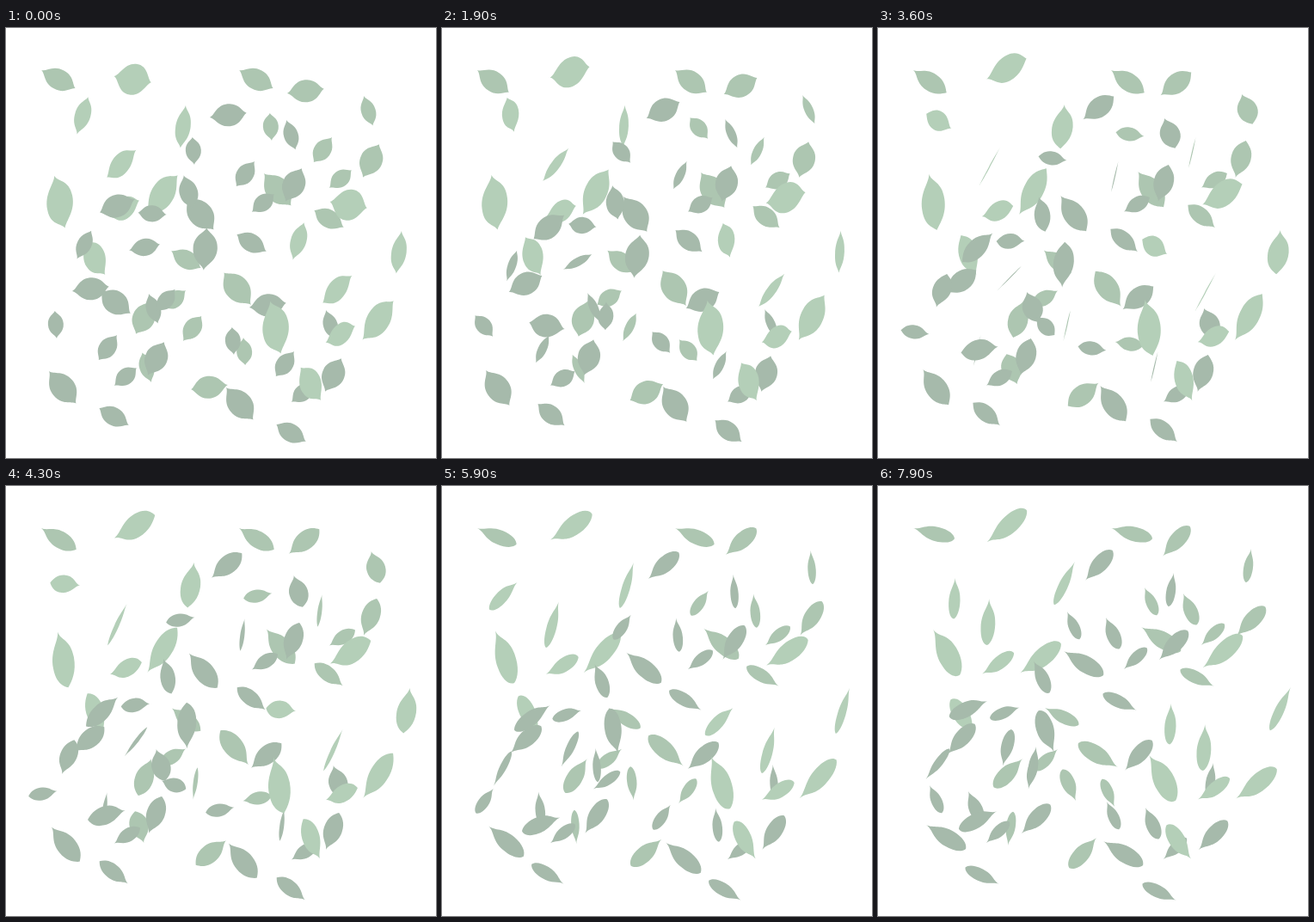
Write an HTML page with a canvas that moves like this. It is 500x500 px and loops after 8 s.

```html
<!DOCTYPE html>
<html lang="en">
<head>
<meta charset="utf-8">
<title>Drifting leaves</title>
<style>
html, body { margin: 0; width: 100%; height: 100%; overflow: hidden; background: #fff; }
canvas { display: block; width: 100vmin; height: 100vmin; }
</style>
</head>
<body>
<canvas id="stage" width="500" height="500"></canvas>
<script>
const ctx = document.getElementById('stage').getContext('2d');
const LOOP = 8000, STEP = 100, END = 7900;
const LIGHT = '#b4cfb8', MID = '#adc6b1', DARK = '#a6baab';
const rad = deg => deg * Math.PI / 180;
const mix = (a, b, u) => a + (b - a) * u;

// Tip position, size and angle; turn is the total rotation, sway a slow swing,
// roll and rollSpeed (degrees, degrees per second) tip the blade edge-on
const cluster = [
  { x: 327, y: 76, dx: 4, dy: 6, len: 43, w: 26, angle: -7, turn: -52, sway: -11 },
  { x: 309, y: 131, dx: 1, dy: -13, len: 32, w: 18, angle: -94, turn: -200 },
  { x: 416, y: 79, dx: 18, dy: -6, len: 36, w: 27, angle: 73, turn: 16, sway: -10,
    roll: 51.4, rollSpeed: 32.1 },
  { x: 379, y: 127, dx: -24, dy: -2, len: 36, w: 23, angle: 126, turn: -59,
    roll: 30, rollSpeed: 17.6 },
  { x: 415, y: 174, dx: 2, dy: 0, len: 43, w: 26, angle: -64, turn: 5, sway: -14 },
  { x: 376, y: 186, dx: 0, dy: -1, len: 33, w: 19, angle: -39, turn: 5, sway: 9 },
  { x: 393, y: 232, dx: -2, dy: 1, len: 40, w: 21, angle: 210, turn: 5, sway: 9 },
  { x: 300, y: 169, dx: 6, dy: -5, len: 49, w: 28, angle: 50, turn: -10, sway: 9 }
];
const single = [
  { x: 41, y: 49, dx: 0, dy: 0, len: 45, w: 24, angle: 28, turn: -5, sway: 9 }
];

// Half outline as two curves, tip at 0 and end at 1
const LEMON = [.14, .06, .2, .5, .52, .5, .82, .5, .88, .1, 1, 0];
const DROP = [.18, .03, .26, .5, .58, .5, .82, .5, .97, .28, 1, 0];

function slimming(t) {
  const u = Math.min(Math.max((t - 1500) / 5000, 0), 1);
  return u * u * (3 - 2 * u);
}

function drawLeaf(leaf, t) {
  const { x, y, dx, dy, len, w, angle, turn, sway = 0, roll = 0, rollSpeed = 0 } = leaf;
  const p = Math.pow(t / END, 1.2), m = slimming(t);
  const swing = sway * Math.sin(Math.PI * t / 5500);
  const length = len * (1 + .1 * m);
  const width = Math.abs(w * Math.cos(rad(roll + rollSpeed * t / 1000))) * (1 - .3 * m);
  const half = LEMON.map((v, i) => mix(v, DROP[i], m) * (i % 2 ? Math.max(width, .8) : length));
  ctx.save();
  ctx.translate(x + dx * p, y + dy * p);
  ctx.rotate(rad(angle + turn * p + swing));
  ctx.beginPath();
  for (const side of [1, -1]) {
    const c = half.map((v, i) => i % 2 ? v * side : v);
    ctx.moveTo(0, 0);
    ctx.bezierCurveTo(...c.slice(0, 6));
    ctx.bezierCurveTo(...c.slice(6));
  }
  ctx.fill();
  ctx.restore();
}

function place(leaves, color, t, x, y, turn = 0, sx = 1, sy = 1) {
  ctx.save();
  ctx.translate(x, y);
  ctx.rotate(rad(turn));
  ctx.scale(sx, sy);
  // A cluster hangs from the middle of its first leaf
  if (leaves === cluster) ctx.translate(-347, -71);
  ctx.fillStyle = color;
  for (const leaf of leaves) drawLeaf(leaf, t);
  ctx.restore();
}

function draw(t) {
  ctx.fillStyle = '#fff';
  ctx.fillRect(0, 0, 500, 500);
  place(cluster, MID, t, 347, 71);
  place(cluster, MID, t, 238, 420, 180);
  place(single, MID, t, 0, 0);
  place(single, MID, t, 230, 0);
  place(cluster, LIGHT, t, 147, 56, 19.3, 1.01, 1.42);
  place(cluster, DARK, t, 257, 99);
  place(cluster, DARK, t, 97, 301);
  place(cluster, DARK, t, 303, 320);
  const s = Math.pow(Math.sin(Math.PI * t / 12800), 1.4);
  place(cluster, DARK, t, 127 - 8 * s, 322 + 66 * s,
    -136.5 - 14 * s, 1 - .14 * s, 1.02 + .13 * s);
  place(cluster, LIGHT, t, 398, 202, 19.3, 1.01, 1.42);
}

const start = performance.now();
function tick() {
  const t = (performance.now() - start) % LOOP;
  draw(Math.floor(t / STEP) * STEP);
  requestAnimationFrame(tick);
}
tick();
</script>
</body>
</html>
```
